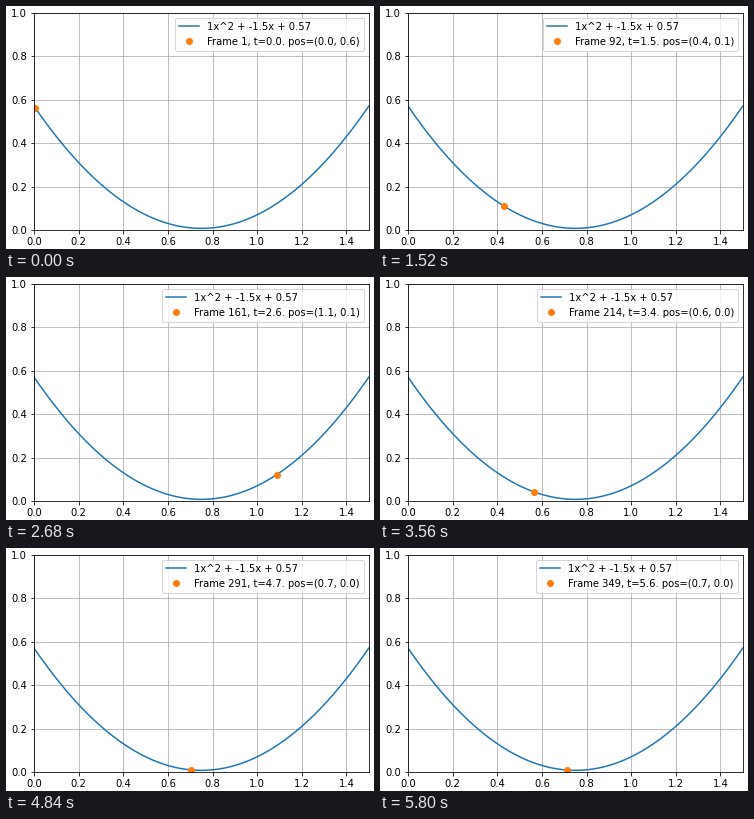
These frames come from a looping animation (368x243 px, 5840 ms). A matplotlib script:

```python
import numpy as np
import matplotlib.pyplot as plt
from matplotlib.animation import FuncAnimation

W, H, DPI = 368, 243, 72
FRAMES, INTERVAL = 146, 40
A, B, C = 1, -1.5, 0.57
BOTTOM = -B / (2 * A)
OMEGA = np.sqrt(2 * A * 9.81)

# Turning points of a bead sliding with dry friction, relative to the bottom
TURNS = [-0.771, 0.6066, -0.48, 0.353, -0.249, 0.148, -0.045]
HEAD_START = 0.1  # the bead enters the first swing already moving
REST = (5.82, -0.036)


def curve(x):
    return A * x**2 + B * x + C


def swing(start, end):
    """Times and offsets of one half swing along the parabola."""
    phase = np.linspace(0, np.pi, 200)
    x = (start + end) / 2 + (start - end) / 2 * np.cos(phase)
    pace = np.sqrt(1 + 4 * x**2) / OMEGA
    steps = (pace[1:] + pace[:-1]) / 2 * np.diff(phase)
    return np.append(0, np.cumsum(steps)), x


def bead_path():
    clock, times, offsets = -HEAD_START, [], []
    for start, end in zip(TURNS, TURNS[1:]):
        t, x = swing(start, end)
        times.extend(clock + t[:-1])
        offsets.extend(x[:-1])
        clock += t[-1]
    # slow creep after the last swing
    times += [clock, REST[0]]
    offsets += [TURNS[-1], REST[1]]
    return np.array(times), BOTTOM + np.array(offsets)


path_t, path_x = bead_path()

plt.rcParams["font.family"] = "DejaVu Sans"
fig = plt.figure(figsize=(W / DPI, H / DPI), dpi=DPI, facecolor="white")
ax = fig.add_axes([28 / W, 19 / H, 334.8 / W, 217.44 / H])
ax.set_xlim(0, 1.5)
ax.set_ylim(0, 1)
ax.set_xticks(np.arange(8) * 0.2)
ax.set_yticks(np.arange(6) * 0.2)
ax.grid()

xs = np.linspace(0, 1.5, 151)
ax.plot(xs, curve(xs), label=f"{A}x^2 + {B}x + {C}")
bead, = ax.plot([0], [C], "o", label="Frame")
legend = ax.legend(loc="upper right")
caption = legend.get_texts()[1]


def update(i):
    step = i * 12 // 5 + 1  # 60 steps per second shown at 25 fps
    x = np.interp(step / 60, path_t, path_x)
    y = curve(x)
    bead.set_data([x], [y])
    caption.set_text(f"Frame {step}, t={step * 0.016:.1f}. pos=({x:.1f}, {y:.1f})")
    return bead, caption


anim = FuncAnimation(fig, update, frames=FRAMES, interval=INTERVAL,
                     repeat=True, repeat_delay=0, blit=False)
plt.show()
```
